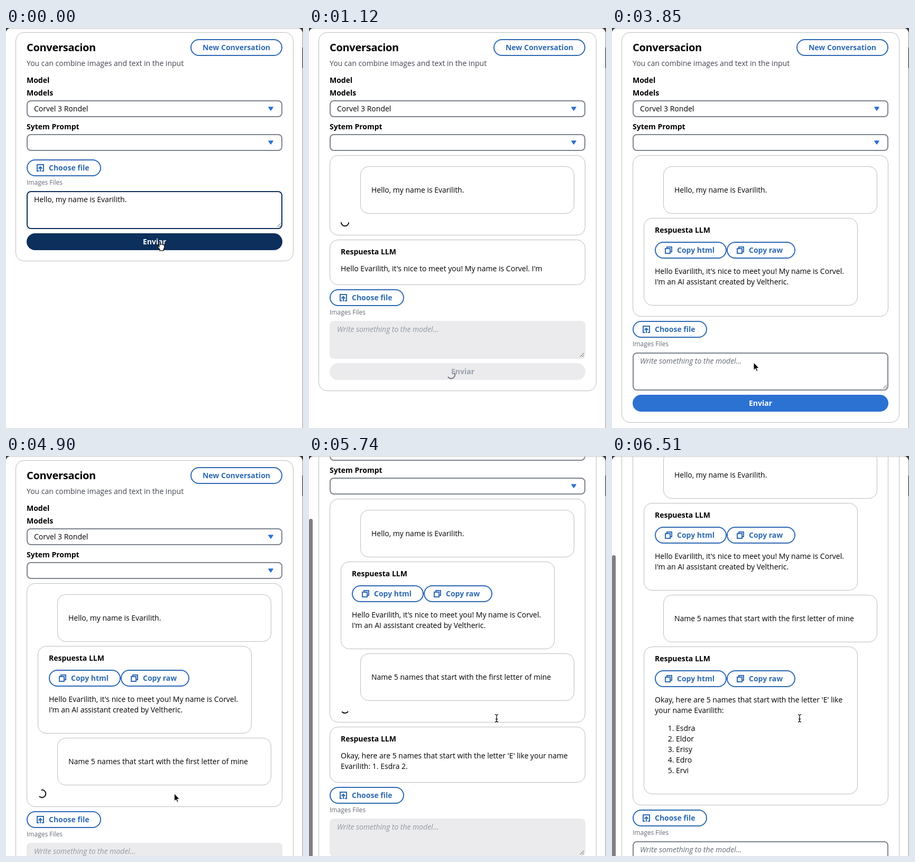
An HTML page that plays this animation: 562x758 px, repeating every 6.58 s.

```html
<!DOCTYPE html>
<html lang="es">
<head>
<meta charset="utf-8">
<title>Conversacion</title>
<style>
html, body { margin: 0; width: 100%; height: 100%; overflow: hidden; background: #3c3c3c; }
body { font: 14px/20px "Open Sans", sans-serif; color: #000; }
#stage { position: absolute; left: 0; top: 0; width: 562px; height: 758px; overflow: hidden; background: #3c3c3c; }
#view { position: absolute; inset: 0 1px 0 0; overflow: hidden; background: #fff; border-radius: 9px 9px 0 0; }
#edge { position: absolute; inset: 0 0 auto; height: 3px; background: linear-gradient(#d2d2d2, #fff0); }
#rim { position: absolute; left: 561px; top: 8px; width: 1px; height: 750px; background: linear-gradient(#8e8e8e 29px, #000 29px 68px, #8e8e8e 68px); }
#view div, #view svg { position: absolute; box-sizing: border-box; }
.t { white-space: nowrap; height: 20px; }
.b, .btn { font-weight: 700; }
.box { border: 1px solid #bbbcc0; border-radius: 16px; background: #fff; }
.field { border: 2px solid #7d838e; border-radius: 8px; background: #fff; }
.btn { height: 32px; line-height: 28px; border: 2px solid #2d69b3; border-radius: 16px; color: #2d69b3; white-space: nowrap; }
.btn svg { left: 16px; top: 6px; fill: none; stroke: currentColor; stroke-width: 2; }
#view p { margin: 0 0 14px; }
ol { margin: 0; padding-left: 40px; }
#send { border: 0; line-height: 32px; text-align: center; color: #fff; }
#area.off { background: #ebebed; border-color: #ebebed; }
.hint { font-style: italic; color: #656a74; }
.off .hint { color: #9499a3; }
.spin { fill: none; stroke: #111; stroke-width: 2; overflow: visible; }
#thumb { left: 555px; width: 7px; height: 900px; background: #7f7f7f; border-radius: 4px; }
#cursor svg { overflow: visible; }
</style>
</head>
<body>
<div id="stage">
  <div id="view"><div id="page"></div><div id="edge"></div></div>
  <div id="rim"></div>
</div>
<script>
const LOOP = 6580, STEP = 70;
const USER = "Evarilith";
const ask1 = `Hello, my name is ${USER}.`;
const ask2 = "Name 5 names that start with the first letter of mine";
const reply1 = `Hello ${USER}, it's nice to meet you! My name is Corvel. I'm an AI assistant created by Veltheric.`;
const reply2 = `Okay, here are 5 names that start with the letter 'E' like your name ${USER}:`;
const names = ["Esdra", "Eldor", "Erisy", "Edro", "Ervi"];
const words1 = reply1.split(" ");
const words2 = (reply2 + names.map((n, i) => ` ${i + 1}. ${n}`).join("")).split(" ");

const view = document.getElementById("view");
const page = document.getElementById("page");

function add(parent, cls, x, y, w, h, html = "") {
  const e = document.createElement("div");
  e.className = cls;
  e.style.cssText = `left:${x}px;top:${y}px;` + (w ? `width:${w}px;` : "") + (h ? `height:${h}px;` : "");
  e.innerHTML = html;
  parent.append(e);
  return e;
}
// A single line of text, placed by its vertical centre.
const text = (parent, x, cy, s, cls = "") => add(parent, "t " + cls, x, cy - 10, 0, 0, s);
const svg = (d, extra = "") => `<svg width="16" height="16" ${extra}><path d="${d}"/></svg>`;
const show = (e, on) => { e.style.display = on ? "" : "none"; };

const UPLOAD = "M5.5 14H2V2h12v12h-3.500M8 15V6.500M4.500 9.500 8 6l3.500 3.500";
const COPY = "M2 5h9v9H2zM5 5V2h9v9h-3";

function iconButton(parent, x, y, w, icon, label) {
  const e = add(parent, "btn", x, y, w, 32, svg(icon));
  add(e, "", 40, 0, 0, 0, label);
  return e;
}
function select(y, value) {
  const e = add(page, "field", 39, y, 484, 32);
  text(e, 12, 14, value);
  add(e, "", 455, 10, 10, 8,
    '<svg width="10" height="8"><path d="M1 1h8L5 7z" fill="#2c72d2" stroke="#2c72d2" stroke-width="1.500" stroke-linejoin="round"/></svg>');
}
function ask(y, s) {
  const e = add(page, "box", 97, y, 405, 90);
  text(e, 20, 44, s);
  return e;
}
function answer(y, h, html) {
  const e = add(page, "box", 60, y, 405, h);
  text(e, 20, 22, "Respuesta LLM", "b");
  iconButton(e, 20, 44, 136, COPY, "Copy html");
  iconButton(e, 156, 44, 130, COPY, "Copy raw");
  add(e, "", 20, 90, 364, 0, html);
  return e;
}
function spinner(parent, x, y, color) {
  const e = add(parent, "", x, y, 16, 16,
    `<svg class="spin" width="16" height="16" style="stroke:${color}"><circle cx="8" cy="8" r="7.200" pathLength="360"/></svg>`);
  return { e, arc: e.querySelector("circle") };
}

const card = add(page, "box", 18, 8, 526, 434);
const title = text(page, 39, 37, "Conversacion", "b");
title.style.fontSize = "20px";
title.style.letterSpacing = "-.3px";
add(page, "btn", 349, 21, 174, 32, "New Conversation").style.textAlign = "center";
text(page, 39, 67, "You can combine images and text in the input").style.color = "#424650";
text(page, 39, 99, "Model", "b");
text(page, 39, 123, "Models", "b");
select(137, "Corvel 3 Rondel");
text(page, 39, 187, "Sytem Prompt", "b");
select(201, "");

const chat = add(page, "box", 39, 241, 484, 152);
const bubbles = [
  ask(262, ask1),
  answer(360, 166, `<p>${reply1}</p>`),
  ask(534, ask2),
  answer(632, 280, `<p>${reply2}</p><ol>${names.map(n => `<li>${n}</li>`).join("")}</ol>`)
];
const chatSpin = spinner(page, 60, 360, "#111");

const stream = add(page, "box", 39, 401, 484, 86);
text(stream, 20, 22, "Respuesta LLM", "b");
const streamText = add(stream, "", 20, 44, 442, 0);

// Everything below the conversation moves as one block.
const form = add(page, "", 39, 249, 484, 172);
iconButton(form, 0, 0, 141, UPLOAD, "Choose file");
const note = text(form, 0, 44, "Images Files");
note.style.cssText += "font-size:12px;color:#656a74";
const area = add(form, "field", 0, 60, 484, 72);
area.id = "area";
const areaText = text(area, 12, 14, "");
add(area, "", 471, 58, 9, 9, '<svg width="9" height="9" stroke="#555"><path d="M1 8 8 1M5 8l3-3"/></svg>');
const send = add(form, "btn", 0, 140, 484, 32);
send.id = "send";
const sendLabel = add(send, "", 0, 0, 484, 32, "Enviar");
const sendSpin = spinner(send, 206, 8, "#737985");

const thumb = add(view, "", 0, 0);
thumb.id = "thumb";
const cursor = add(view, "", 0, 0);
cursor.id = "cursor";
const POINTERS = {
  arrow: svg("M0 0v14.500l3.400-3.200 2.300 5.200 2.200-1-2.300-5h4.600z", 'stroke="#fff"'),
  beam: svg("M-3-7q3 0 3 2.500v9q0 2.500-3 2.500M3-7q-3 0-3 2.500v9q0 2.500 3 2.500M-2 1.500h4", 'fill="none" stroke="#111" stroke-width="1.300"'),
  hand: svg("M-3-7q1.500-1.500 2.500 0v5l1-1.500 2 .5 1-.2 1.500 1 1.500 0 1.200 1.500v4l-1.700 3v2.500h-7v-2l-4-5.500q0-2 2 -.8l1 1z", 'fill="#fff" stroke="#111" stroke-width="1.200"') 
};

function track(keys, t) {
  const i = keys.findIndex(k => k[0] > t);
  if (i < 0) return keys[keys.length - 1].slice(1);
  if (i === 0) return keys[0].slice(1);
  const a = keys[i - 1], b = keys[i], u = (t - a[0]) / (b[0] - a[0]);
  return a.slice(1).map((v, j) => v + (b[j + 1] - v) * u);
}
const PATH = [
  [0, 292, 413], [3290, 318, 500], [3780, 268, 634], [4480, 268, 634],
  [4690, 300, 711], [4830, 300, 711], [5040, 355, 497]
];
const SCROLL = [[5040, 0], [5390, 76], [5460, 88], [6020, 231], [6230, 231], [6510, 271]];
const THUMB = [[0, 15], [88, 72], [231, 165], [271, 188]];

function turn(s, age, centre) {
  const sweep = 28 + 230 * Math.sin(Math.PI * (age - 490) / 1400) ** 2;
  const angle = centre + (age - 490) / 700 * 360 - sweep / 2;
  s.arc.setAttribute("stroke-dasharray", `${sweep} ${360 - sweep}`);
  s.arc.setAttribute("transform", `rotate(${angle} 8 8)`);
}

function draw(t) {
  const load1 = t >= 210 && t < 1330, load2 = t >= 4830 && t < 5950;
  const loading = load1 || load2;
  const count = t < 210 ? 0 : t < 1330 ? 1 : t < 4830 ? 2 : t < 5950 ? 3 : 4;

  // Conversation
  bubbles.forEach((b, i) => show(b, i < count));
  const bottom = [241, 393, 547, 665, 933][count];
  show(chat, count > 0);
  chat.style.height = bottom - 241 + "px";
  show(chatSpin.e, loading);
  chatSpin.e.style.top = bottom - 33 + "px";

  // Streamed answer
  const n = load1 ? (t - 700) / 35 : load2 ? 8 + (t - 5460) / 28 : 0;
  let top = bottom + 8;
  show(stream, n >= 1);
  if (n >= 1) {
    streamText.textContent = (load1 ? words1 : words2).slice(0, Math.floor(n)).join(" ");
    const h = 66 + streamText.offsetHeight;
    stream.style.top = top + "px";
    stream.style.height = h + "px";
    top += h + 8;
  }
  form.style.top = top + "px";
  card.style.height = top + 185 + "px";

  // Input and button
  const typed = t < 210 ? ask1
    : t >= 4060 && t < 4830 ? ask2.slice(0, Math.ceil((t - 3990) / 70 * 6.700)) : "";
  const focus = t < 210 || (t >= 3990 && t < 4830);
  area.classList.toggle("off", loading);
  area.style.borderColor = loading ? "" : focus ? "#0c2f5c" : "";
  areaText.textContent = typed || "Write something to the model...";
  areaText.classList.toggle("hint", !typed);
  const pressed = t < 210 || (t >= 4690 && t < 4830);
  send.style.background = loading ? "#ebebed" : pressed ? "#0c2f5c" : "#2c72d2";
  send.style.color = loading ? "#9aa1ac" : "";
  sendLabel.style.paddingLeft = loading ? "20px" : "0";
  show(sendSpin.e, loading);
  if (loading) {
    const age = t - (load1 ? 210 : 4970), centre = load1 ? -125 : -55;
    turn(chatSpin, age, centre);
    turn(sendSpin, age, centre - 33);
  }

  // Scrolling
  const y = track(SCROLL, t)[0];
  page.style.transform = `translateY(${-Math.round(y)}px)`;
  show(thumb, y > 0);
  thumb.style.top = Math.round(track(THUMB, y)[0]) + "px";

  // Pointer
  show(cursor, t < 280 || t >= 3360);
  const kind = t < 280 || (t >= 4690 && t < 4830) ? "hand"
    : (t >= 3920 && t < 4690) || (t >= 5040 && t < 5950) || t >= 6300 ? "beam" : "arrow";
  if (cursor.dataset.kind !== kind) {
    cursor.dataset.kind = kind;
    cursor.innerHTML = POINTERS[kind];
  }
  const [px, py] = track(PATH, t);
  cursor.style.transform = `translate(${px}px, ${py}px)`;
}

const start = performance.now();
function frame() {
  const t = (performance.now() - start) % LOOP;
  draw(Math.floor(t / STEP) * STEP);
  requestAnimationFrame(frame);
}
draw(0);
requestAnimationFrame(frame);
</script>
</body>
</html>
```
